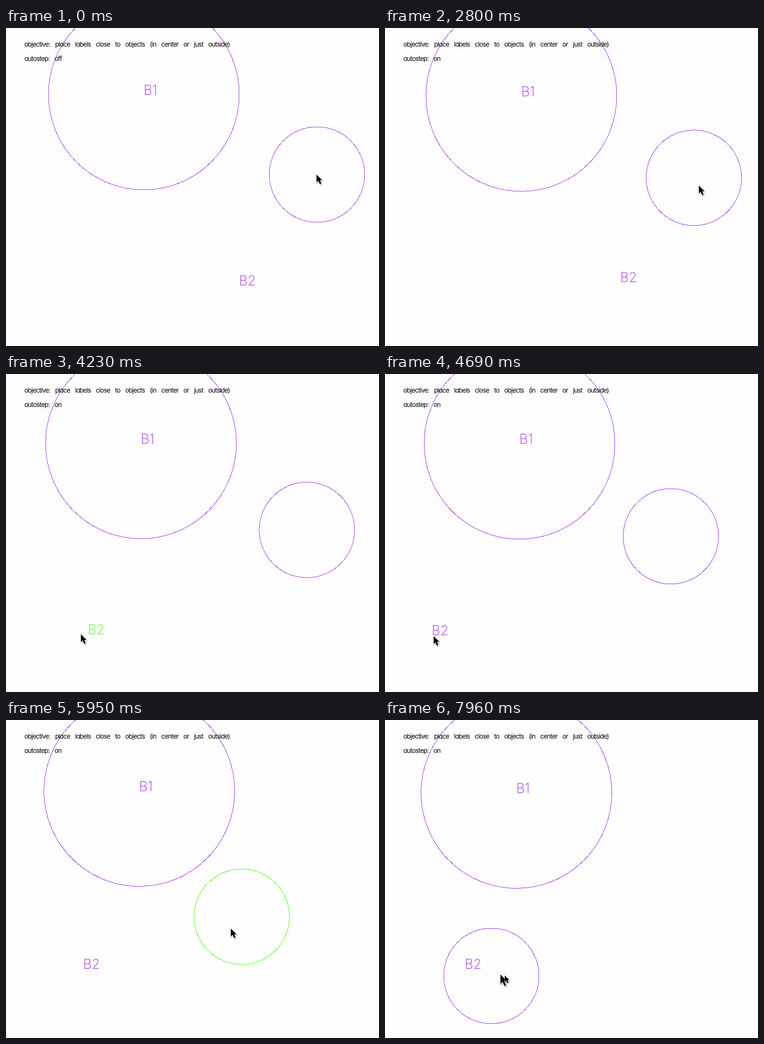
Animation of 782x666 px, one loop 8000 ms. Source, as an HTML page:

```html
<!DOCTYPE html>
<html lang="en">
<head>
<meta charset="utf-8">
<title>Label placement</title>
<style>
  html, body { margin: 0; width: 100%; height: 100%; overflow: hidden; background: #fefefe; }
  svg { display: block; width: 782px; height: 666px; }
  circle { fill: none; stroke-width: 1; shape-rendering: crispEdges; }
  text { font-family: Inter, Roboto, sans-serif; }
  .note { font-size: 13.5px; letter-spacing: -0.8px; word-spacing: 7.4px; font-feature-settings: "cv11"; }
  .label { font-size: 28px; font-weight: 200; }
  use { filter: drop-shadow(1px 2px 1px rgba(0, 0, 0, .3)); }
</style>
</head>
<body>
<svg viewBox="0 0 782 666">
  <defs>
    <path id="arrow" d="M0 0V16.5L3.8 13L7 20L10 18.7L7 12H12Z"
      fill="#000" stroke="#fff" stroke-width="1.4" paint-order="stroke"/>
  </defs>
  <circle id="big" r="200"/>
  <circle id="small" r="100"/>
  <text id="b1" class="label">B1</text>
  <text id="b2" class="label">B2</text>
  <text class="note" x="38.5" y="39">objective: place labels close to objects (in center or just outside)</text>
  <text class="note" x="38.5" y="69">autostep: <tspan id="mode">off</tspan></text>
  <use id="pointer" href="#arrow"/>
  <use id="ghost" href="#arrow"/>
</svg>
<script>
const LOOP = 8000, START = 1270, STEP = 57.18, LAST_STEP = 117;
const PURPLE = '#a32cff', GREEN = '#48ff00';
const el = id => document.getElementById(id);

// Pointer stops as [step, x, y]; negative steps precede the simulation.
const stops = [
  [-20, 651, 307], [-18, 656, 314], [-14, 656, 314], [-10, 658, 330], [31, 658, 330],
  [42, 507, 528], [47, 292, 540], [52, 157, 545], [57, 102, 549], [73, 102, 549],
  [79, 537, 366], [88, 340, 578], [97, 222, 537], [LAST_STEP, 242, 533]
];

function pointerAt(step) {
  const i = stops.findIndex(s => s[0] > step);
  if (i === 0) return stops[0].slice(1);
  if (i < 0) return stops[stops.length - 1].slice(1);
  const [s0, x0, y0] = stops[i - 1], [s1, x1, y1] = stops[i];
  const u = (step - s0) / (s1 - s0);
  return [x0 + (x1 - x0) * u, y0 + (y1 - y0) * u];
}

const labelHeld = step => step > 42 && step <= 58;
const circleHeld = step => step > 79 && step <= 98;

// A dragged object trails the pointer by one step.
function drag(object, step, dx, dy) {
  const [x, y] = pointerAt(step - 1);
  object.x = x + dx;
  object.y = y + dy;
}

// Steady creep outside the circle, a spring when far apart, rest inside.
const pull = distance => distance < 100 ? 0 : Math.max(0.3, (distance - 245) * 0.0155);

function simulate(steps) {
  const circle = { x: 652, y: 307 }, label = { x: 506, y: 529 };
  for (let step = 1; step <= steps; step++) {
    const dx = label.x - circle.x, dy = label.y - circle.y;
    const distance = Math.hypot(dx, dy);
    const move = pull(distance) / distance;
    circle.x += dx * move;
    circle.y += dy * move;
    label.x -= dx * move;
    label.y -= dy * move;
    if (labelHeld(step)) drag(label, step, 5, -9);
    if (circleHeld(step)) drag(circle, step, 1, -1);
  }
  return { circle, label };
}

function set(id, attrs) {
  for (const name in attrs) el(id).setAttribute(name, attrs[name]);
}

function draw(time) {
  const step = Math.floor((time - START) / STEP + 0.3);
  const on = time >= START, end = step >= LAST_STEP;
  const { circle, label } = simulate(step);
  const drift = Math.max(0, step) * 0.1154;
  const x = 289 - drift, y = 139 + drift;
  const [px, py] = pointerAt(step);

  set('big', { cx: x, cy: y, stroke: PURPLE });
  set('small', { cx: circle.x, cy: circle.y, stroke: circleHeld(step) ? GREEN : PURPLE });
  set('b1', { x: x - 0.5, y: y + 0.5, fill: PURPLE });
  set('b2', { x: label.x - 17.5, y: label.y + 10, fill: labelHeld(step) ? GREEN : PURPLE });
  set('pointer', { transform: `translate(${px} ${py}) scale(${end ? 1.2 : 1})` });
  set('ghost', { transform: `translate(${px + 9} ${py + 2}) scale(.8)`, visibility: end ? 'visible' : 'hidden' });
  el('mode').textContent = on ? 'on' : 'off';
}

draw(0);
const begin = performance.now();
function tick() {
  draw((performance.now() - begin) % LOOP);
  requestAnimationFrame(tick);
}
requestAnimationFrame(tick);
</script>
</body>
</html>
```
